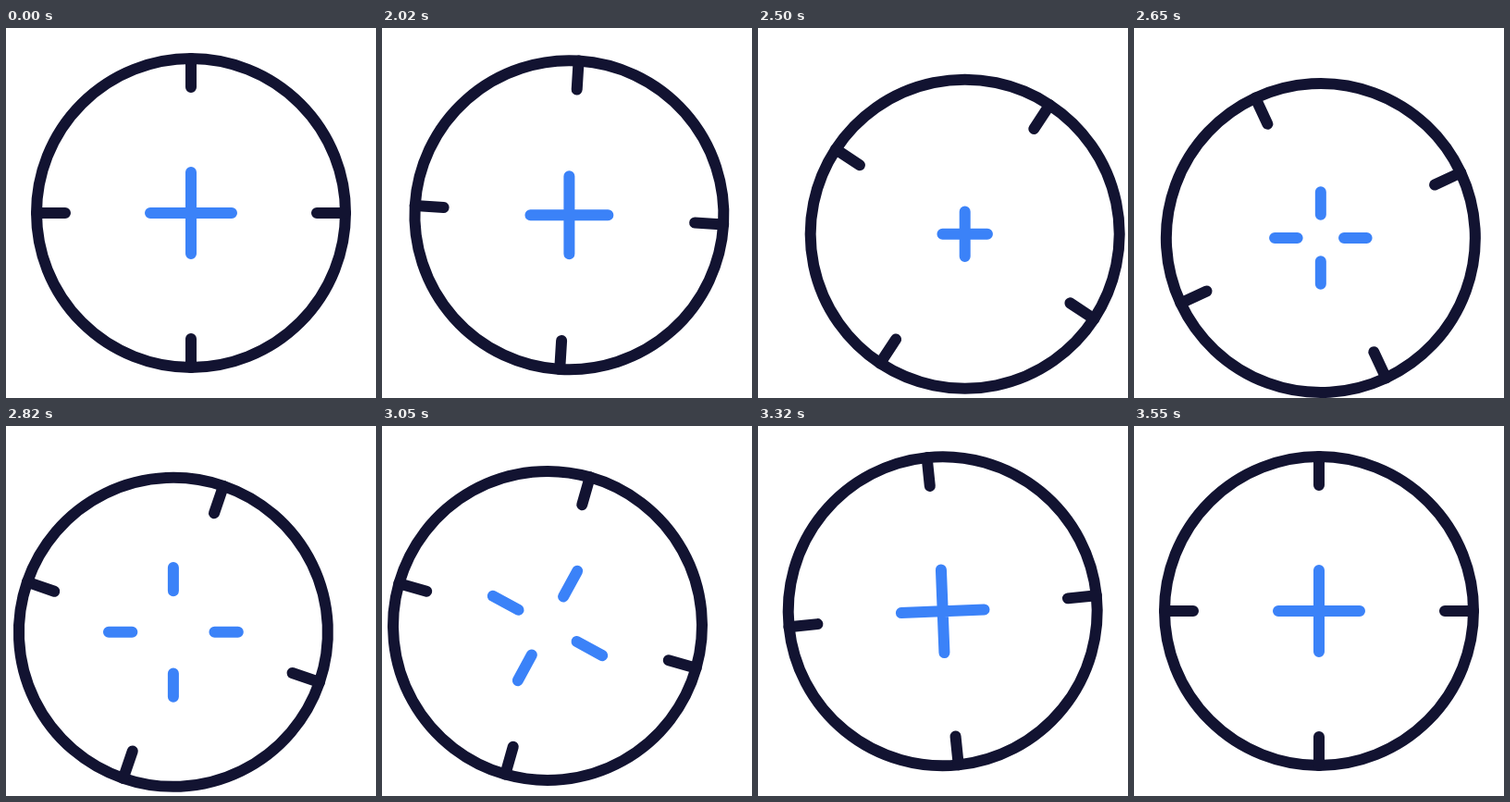
Write an HTML page that moves like this. It is 400 px wide and 400 px high and loops after 3570 ms.

```html
<!DOCTYPE html>
<html lang="en">
<head>
<meta charset="utf-8">
<title>Crosshair</title>
<style>
  html, body { margin: 0; width: 100%; height: 100%; overflow: hidden; background: #fff; }
  svg { display: block; width: 100vw; height: 100vh; }
  g { fill: none; stroke-width: 12; stroke-linecap: round; }
  #ring { stroke: #121331; }
  #cross { stroke: #3b82f8; }
</style>
</head>
<body>
<svg viewBox="0 0 400 400">
  <g id="ring">
    <circle r="167"/>
    <path d="M0-167V-136M0 167V136M-167 0H-136M167 0H136"/>
  </g>
  <g id="cross"><path id="arms"/></g>
</svg>
<script>
const LOOP = 3570, STEP = 25;
const ring = document.getElementById('ring');
const cross = document.getElementById('cross');
const arms = document.getElementById('arms');

const mix = (a, b, u) => a + (b - a) * u;
const bezier = (a, b, c, d, u) => {
  const v = 1 - u;
  return v * v * v * a + 3 * v * v * u * b + 3 * v * u * u * c + u * u * u * d;
};

// Monotone cubic curve through [time, value] keys
function track(keys) {
  const n = keys.length - 1;
  const slope = i => (keys[i + 1][1] - keys[i][1]) / (keys[i + 1][0] - keys[i][0]);
  const tangent = keys.map((_, i) => {
    if (i === 0 || i === n) return 0;
    const a = slope(i - 1), b = slope(i);
    return a * b > 0 ? 2 * a * b / (a + b) : 0;
  });
  return t => {
    if (t <= keys[0][0]) return keys[0][1];
    if (t >= keys[n][0]) return keys[n][1];
    const i = keys.findIndex(k => k[0] > t) - 1;
    const [t0, v0] = keys[i], [t1, v1] = keys[i + 1];
    const h = t1 - t0, u = (t - t0) / h;
    return bezier(v0, v0 + tangent[i] * h / 3, v1 - tangent[i + 1] * h / 3, v1, u);
  };
}

// Travel: 0-1 to the lower right, 1-2 over to the left, 2-3 back home
const travel = track([
  [2000, 0], [2025, .1], [2100, .52], [2160, .82], [2250, .957], [2490, 1],
  [2525, 1.09], [2650, 1.48], [2800, 1.82], [3000, 2],
  [3050, 2.16], [3075, 2.29], [3175, 2.93], [3300, 2.985], [3550, 3]
]);
const unwind = track([[3000, -90], [3050, -74.1], [3175, -24.5], [3300, -7], [3550, 0]]);
const gather = track([[2950, 0], [3000, .1], [3050, .317], [3175, .867], [3300, .97], [3550, 1]]);

function pose(t) {
  const p = travel(t), back = gather(t);
  let x, y, turn, gap = 0, len;
  if (p < 1) {
    x = mix(200, 224, p);
    y = mix(200, 222.5, p);
    turn = 35 * p;
    len = mix(44, 23.5, p);
  } else {
    const u = Math.min(p - 1, 1), v = Math.max(p - 2, 0);
    x = v ? mix(175, 200, v) : bezier(224, 217, 185, 175, u);
    y = v ? mix(219, 200, v) : bezier(222.5, 229, 229, 219, u);
    turn = t < 3000 ? mix(35, -90, u) : unwind(t);
    gap = mix(52.5 * u, 0, back);
    len = mix(mix(23.5, 25.7, u), 44, back);
  }
  return { x, y, turn, gap, len, spin: 90 * back };
}

function draw(now) {
  const t = Math.floor(now % LOOP / 10) * 10;
  const s = pose(Math.floor((t + 5) / STEP) * STEP);
  const a = s.gap, b = s.gap + s.len;
  ring.setAttribute('transform', `translate(${s.x} ${s.y}) rotate(${s.turn})`);
  cross.setAttribute('transform', `translate(${s.x} ${s.y}) rotate(${s.spin})`);
  arms.setAttribute('d', `M0 ${-a}V${-b}M0 ${a}V${b}M${-a} 0H${-b}M${a} 0H${b}`);
}

let start;
function tick(now) {
  start ??= now;
  draw(now - start);
  requestAnimationFrame(tick);
}
draw(0);
requestAnimationFrame(tick);
</script>
</body>
</html>
```
